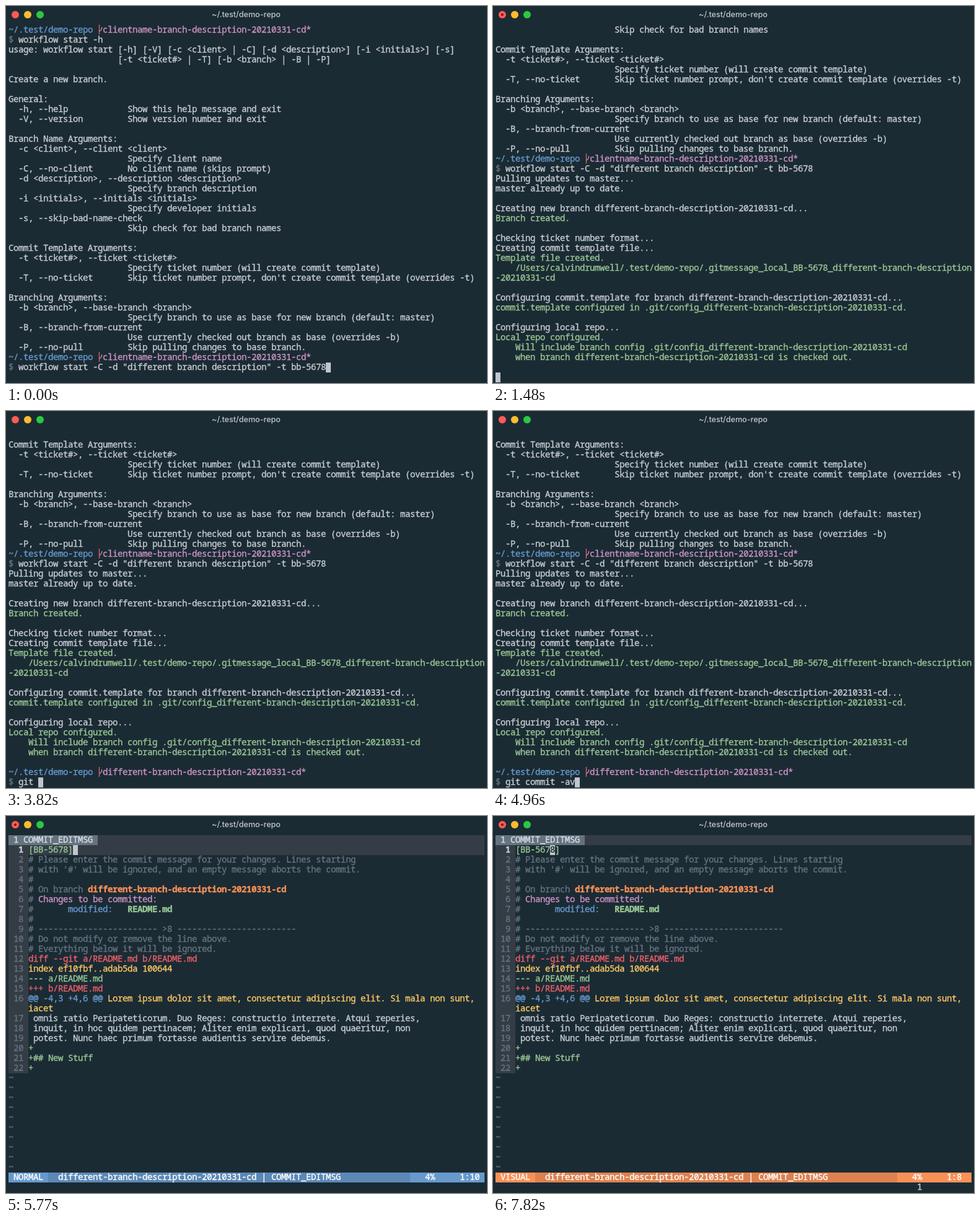
Animation, 776 px wide and 608 px high, one loop 8000 ms. Source, as an HTML page:

```html
<!DOCTYPE html>
<html lang="en">
<head>
<meta charset="utf-8">
<title>Terminal</title>
<style>
  html, body { margin: 0; width: 100%; height: 100%; overflow: hidden; background: #1b2b34; }
  svg { display: block; width: 776px; height: 608px; }
  text {
    font: 500 14px "Noto Sans Mono", "Liberation Mono", monospace;
    letter-spacing: -0.4px;
    white-space: pre;
    stroke-width: 0.35px;
  }
  .bold { font-weight: 700; }
  .title { font: 500 12.6px Inter, "Open Sans", sans-serif; letter-spacing: 0; }
</style>
</head>
<body>
<svg viewBox="0 0 776 608" xmlns="http://www.w3.org/2000/svg">
  <rect width="776" height="608" fill="#1b2b34"/>
  <circle cx="15" cy="14" r="6" fill="#ff5b54"/>
  <circle cx="35" cy="14" r="6" fill="#febb2f"/>
  <circle cx="55" cy="14" r="6" fill="#2ac840"/>
  <circle id="dot" cx="15" cy="14" r="2" fill="#7a0d0b"/>
  <text class="title" x="387.5" y="18" text-anchor="middle" fill="#c3c8cc">~/.test/demo-repo</text>
  <g id="screen"></g>
</svg>
<script>
const LOOP = 8000, ROWS = 36, COLS = 96, CW = 8, CH = 16, LEFT = 4, TOP = 31;
const NS = 'http://www.w3.org/2000/svg';
const BG = '#1b2b34', PANEL = '#343d46', FG = '#c0c5ce', GREY = '#65737e';
// Colour keys for "^k" marks in a line; a capital key means bold.
const INK = {
  t: '#c8ccd2', c: GREY, r: '#ec5f67', o: '#f99157', y: '#fac863', g: '#99c794',
  b: '#6699cc', m: '#cc93c4', l: '#d8dee9', w: '#ffffff', k: BG
};
const BRANCH = 'different-branch-description-20210331-cd';
const prompt = branch => `^b~/.test/demo-repo ^m\u0001${branch}*`;
const option = (flags, help) => ('  ' + flags).padEnd(24) + help;
const help = text => ' '.repeat(24) + text;

const LOG = [
  prompt('clientname-branch-description-20210331-cd'),
  '^c$^t workflow start -h',
  'usage: workflow start [-h] [-V] [-c <client> | -C] [-d <description>] [-i <initials>] [-s]',
  ' '.repeat(22) + '[-t <ticket#> | -T] [-b <branch> | -B | -P]',
  '',
  'Create a new branch.',
  '',
  'General:',
  option('-h, --help', 'Show this help message and exit'),
  option('-V, --version', 'Show version number and exit'),
  '',
  'Branch Name Arguments:',
  '  -c <client>, --client <client>',
  help('Specify client name'),
  option('-C, --no-client', 'No client name (skips prompt)'),
  '  -d <description>, --description <description>',
  help('Specify branch description'),
  '  -i <initials>, --initials <initials>',
  help('Specify developer initials'),
  '  -s, --skip-bad-name-check',
  help('Skip check for bad branch names'),
  '',
  'Commit Template Arguments:',
  '  -t <ticket#>, --ticket <ticket#>',
  help('Specify ticket number (will create commit template)'),
  option('-T, --no-ticket', "Skip ticket number prompt, don't create commit template (overrides -t)"),
  '',
  'Branching Arguments:',
  '  -b <branch>, --base-branch <branch>',
  help('Specify branch to use as base for new branch (default: master)'),
  '  -B, --branch-from-current',
  help('Use currently checked out branch as base (overrides -b)'),
  option('-P, --no-pull', 'Skip pulling changes to base branch.'),
  prompt('clientname-branch-description-20210331-cd'),
  '^c$^t workflow start -C -d "different branch description" -t bb-5678',
  'Pulling updates to master...',
  'master already up to date.',
  '',
  `Creating new branch ${BRANCH}...`,
  '^gBranch created.',
  '',
  'Checking ticket number format...',
  'Creating commit template file...',
  '^gTemplate file created.',
  '^g    /Users/calvindrumwell/.test/demo-repo/.gitmessage_local_BB-5678_different-branch-description',
  '^g-20210331-cd',
  '',
  `Configuring commit.template for branch ${BRANCH}...`,
  `^gcommit.template configured in .git/config_${BRANCH}.`,
  '',
  'Configuring local repo...',
  '^gLocal repo configured.',
  `^g    Will include branch config .git/config_${BRANCH}`,
  `^g    when branch ${BRANCH} is checked out.`,
  '',
  prompt(BRANCH)
];

const COMMAND = 'git commit -av';
const KEYS = [3550, 3640, 3730, 3820, 3990, 3990, 4260, 4350, 4430, 4520, 4610, 4790, 4880, 4960];

const DASHES = '-'.repeat(24);
const MESSAGE = [
  '^g[BB-5678]',
  '^c# Please enter the commit message for your changes. Lines starting',
  "^c# with '#' will be ignored, and an empty message aborts the commit.",
  '^c#',
  `^c# On branch ^O${BRANCH}`,
  '^c# ^mChanges to be committed:',
  '^c#       ^bmodified:   ^GREADME.md',
  '^c#',
  `^c# ${DASHES} >8 ${DASHES}`,
  '^c# Do not modify or remove the line above.',
  '^c# Everything below it will be ignored.',
  '^rdiff --git a/README.md b/README.md',
  '^yindex ef10fbf..adab5da 100644',
  '^g--- a/README.md',
  '^r+++ b/README.md',
  '^b@@ -4,3 +4,6 @@^y Lorem ipsum dolor sit amet, consectetur adipiscing elit. Si mala non sunt, iacet',
  ' omnis ratio Peripateticorum. Duo Reges: constructio interrete. Atqui reperies,',
  ' inquit, in hoc quidem pertinacem; Aliter enim explicari, quod quaeritur, non',
  ' potest. Nunc haec primum fortasse audientis servire debemus.',
  '^g+',
  '^g+## New Stuff',
  '^g+'
];

const screen = document.getElementById('screen');
const dot = document.getElementById('dot');

function add(tag, attrs, text) {
  const el = document.createElementNS(NS, tag);
  for (const name in attrs) el.setAttribute(name, attrs[name]);
  if (text) el.textContent = text;
  screen.appendChild(el);
}

function fill(row, col, width, color, height = 1) {
  add('rect', { x: LEFT + col * CW, y: TOP + row * CH, width: width * CW, height: height * CH, fill: color });
}

function branchIcon(row, col) {
  const x = LEFT + col * CW, y = TOP + row * CH;
  const line = (d, stroke) => add('path', { d, stroke, fill: 'none', 'stroke-width': 1.3 });
  line(`M${x + 2.5} ${y - 1}v16`, INK.r);
  line(`M${x + 6.5} ${y + 3}v2q0 2-4 5`, INK.m);
}

function write(row, col, line) {
  const parts = ('^t' + line).split(/\^(\w)/);
  for (let i = 1; i < parts.length; i += 2) {
    const key = parts[i];
    let text = parts[i + 1];
    if (text[0] === '\u0001') {
      branchIcon(row, col++);
      text = text.slice(1);
    }
    if (!text) continue;
    const ink = INK[key.toLowerCase()];
    const attrs = { x: LEFT + col * CW, y: TOP + row * CH + 12, fill: ink, stroke: ink };
    if (key < 'a') attrs.class = 'bold';
    add('text', attrs, text);
    col += text.length;
  }
}

function drawShell(count, curLine, curCol, input) {
  const lines = LOG.slice(0, count);
  if (input !== undefined) lines.push('^c$^t ' + input);
  const top = Math.max(0, curLine - ROWS + 1);
  fill(curLine - top, curCol, 1, FG);
  lines.slice(top).forEach((line, row) => write(row, 0, line));
}

function drawEditor(column, visual) {
  fill(0, 0, COLS, PANEL);
  fill(0, 0, 18, GREY);
  write(0, 1, '^l1 COMMIT_EDITMSG');
  if (!visual) fill(1, 0, COLS, PANEL);
  fill(1, 0, 4, PANEL, 23);

  let row = 1;
  MESSAGE.forEach((line, i) => {
    write(row, 0, (i ? '^c' : '^T') + String(i + 1).padStart(3));
    const wrap = line.indexOf('iacet');
    if (wrap < 0) {
      write(row++, 4, line);
    } else {
      write(row++, 4, line.slice(0, wrap));
      write(row++, 4, '^y' + line.slice(wrap));
    }
  });
  while (row < 34) write(row++, 0, '^c~');

  fill(1, 3 + column, 1, FG);
  write(1, 3 + column, '^k' + ('[BB-5678]'[column - 1] || ''));

  fill(34, 0, COLS, visual ? INK.o : INK.b);
  fill(34, 8, 73, visual ? '#de814e' : '#5b88b6');
  write(34, 1, visual ? '^wVISUAL' : '^wNORMAL');
  write(34, 10, `^w${BRANCH} | COMMIT_EDITMSG`);
  write(34, 84, '^w4%');
  write(34, 91, '^w1:' + column);
  if (visual) write(35, 85, '1');
}

// Each scene holds from its start until the next one begins.
const SCENES = [
  [0, () => drawShell(35, 34, 64)],
  [500, () => drawShell(35, 35, 0)],
  [860, () => drawShell(36, 36, 0)],
  [1390, () => drawShell(39, 39, 0)],
  [1480, () => drawShell(55, 55, 0)],
  [1570, typed => drawShell(56, 56, 2 + typed, COMMAND.slice(0, typed))],
  [5410, () => fill(0, 0, 1, FG)],
  [5590, () => drawEditor(10, false)],
  [7110, () => drawEditor(1, false)],
  [7650, () => drawEditor(8, false)],
  [7820, () => drawEditor(8, true)]
];

let shown = '';
function render(t) {
  const edited = (t >= 1040 && t < 2290) || t >= 5770;
  dot.setAttribute('visibility', edited ? 'visible' : 'hidden');
  const scene = SCENES.filter(s => t >= s[0]).length - 1;
  const typed = KEYS.filter(k => t >= k).length;
  const state = scene + ':' + typed;
  if (state === shown) return;
  shown = state;
  screen.replaceChildren();
  SCENES[scene][1](typed);
}

const start = performance.now();
function tick() {
  render((performance.now() - start) % LOOP);
  requestAnimationFrame(tick);
}
tick();
</script>
</body>
</html>
```
